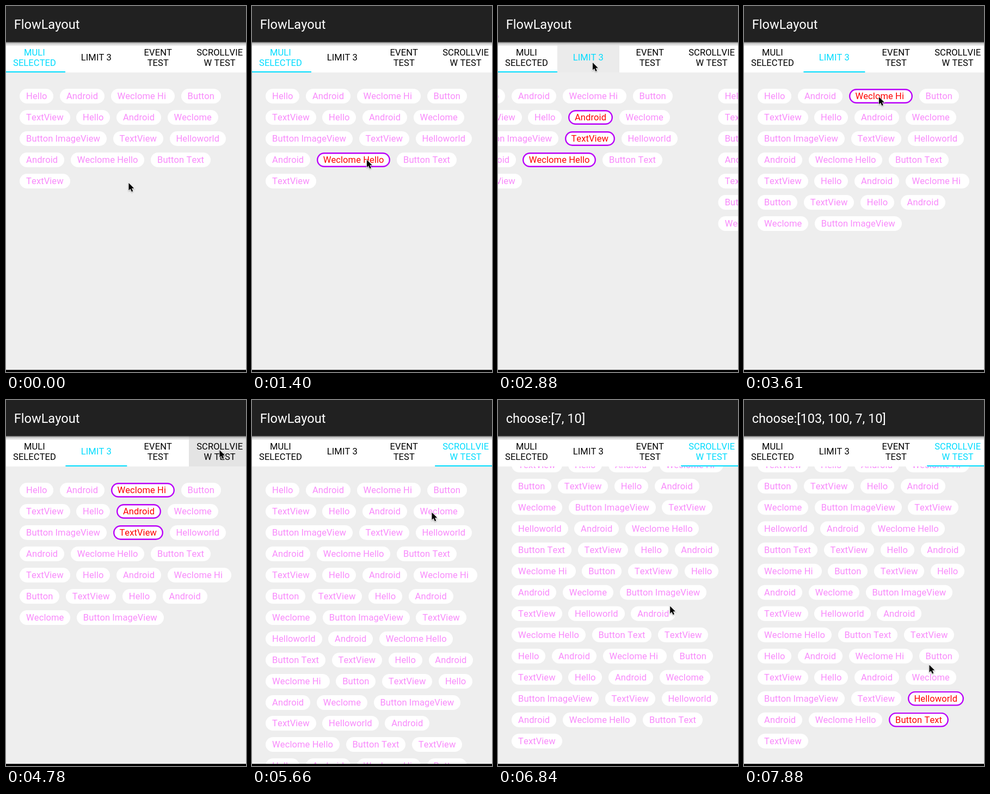
Write an HTML page that moves like this. It is 441 px wide and 672 px high and loops after 8 s.

```html
<!DOCTYPE html>
<html lang="en">
<head>
<meta charset="utf-8">
<title>FlowLayout</title>
<style>
  html, body { margin: 0; width: 100%; height: 100%; overflow: hidden; }
  #stage {
    position: relative; width: 441px; height: 672px; overflow: hidden; background: #eee;
    font: 16.54px/27px Roboto, sans-serif; font-kerning: none; letter-spacing: 0.08px; white-space: pre;
  }
  #bar, #shade, #tabs, #view, #foot, #cursor, #white, #line, .tab, .page { position: absolute; }
  #bar, #shade, #view, #foot { left: 0; width: 441px; }
  #bar {
    top: 0; height: 66px; background: #212121; color: #fff;
    font-size: 23.6px; line-height: 68px; text-indent: 14.7px; letter-spacing: 0;
  }
  #shade { top: 66px; height: 7px; background: linear-gradient(#0009, #0002 40%, #0000); }
  #tabs { left: -4.2px; top: 66px; width: 453.6px; height: 56px; }
  #white { left: 0; top: 6.5px; width: 100%; height: 49.5px; background: #fff; }
  .tab {
    top: 0; width: 25%; height: 56px; padding-top: 1px; box-sizing: border-box;
    display: flex; align-items: center; justify-content: center; text-align: center; line-height: 19px;
  }
  #line { top: 53.7px; left: 0; width: 25%; height: 2.3px; background: #00dcff; }
  #view { top: 122px; height: 546px; overflow: hidden; }
  .page {
    left: 25.3px; top: 30px; width: 400px;
    display: flex; flex-wrap: wrap; gap: 11.96px 11.8px;
  }
  .chip { height: 27px; padding: 0 11.8px; border-radius: 14px; background: #fff; color: #f88bfb; }
  .chip.on { color: #f00; box-shadow: inset 0 0 0 2.4px #b900f8; }
  #foot { top: 668px; height: 4px; background: #000; }
  #cursor { left: -2px; top: -2px; filter: drop-shadow(0 1px 1px #0005); }
</style>
</head>
<body>
<div id="stage"><div id="view"></div><div id="tabs"><div id="white"></div></div><div id="shade"></div>
<div id="bar"></div><div id="foot"></div>
<svg id="cursor" width="18" height="24" viewBox="-2 -2 18 24">
  <path transform="scale(.95)" d="M0 0V14.2L3.2 11.2L5.7 16.8L8.2 15.7L5.8 10.3H10.3Z" stroke="#fff" stroke-width="1.5" paint-order="stroke"/>
</svg></div>
<script>
const LOOP = 8000, PAGE = 453.6, TAB = PAGE / 4, EDGE = 4.2;
const FLING = { start: 32, steps: 3.455, distance: 708.3 };
const $ = id => document.getElementById(id);

const words = ['Hello', 'Android', 'Weclome Hi ', 'Button', 'TextView', 'Hello', 'Android', 'Weclome',
  'Button ImageView', 'TextView', 'Helloworld', 'Android', 'Weclome Hello', 'Button Text', 'TextView'];
const hashOrder = [103, 100, 7, 10];

// Pointer stops: [screen step, x, y]. From step 0 on, a stop taps whatever lies under it.
const stops = [
  [-14, 225.5, 325], [-9, 211, 282.5], [0, 211, 282.5], [4, 243, 243], [6, 243, 206], [10, 174, 104],
  [15, 248, 167], [18, 243, 206], [20, 243, 241], [24, 392.5, 92],
  [30, 330.5, 206.5], [32, 345, 243], [34, 310.5, 65.5], [40, 320, 587], [42, 345, 547], [44, 340.5, 486.5]
];

function add(parent, cls, text = '') {
  const el = document.createElement('div');
  el.className = cls;
  el.textContent = text;
  return parent.appendChild(el);
}

const pages = [15, 24, 15, 105].map(count => {
  const el = add($('view'), 'page');
  const chips = Array.from({ length: count }, (_, i) => add(el, 'chip', words[i % words.length]));
  return { el, chips };
});
const tabs = ['MULI\nSELECTED', 'LIMIT 3', 'EVENT\nTEST', 'SCROLLVIE\nW TEST'].map((label, i) => {
  const tab = add($('tabs'), 'tab', label);
  tab.style.left = i * TAB + 'px';
  return tab;
});
const line = add($('tabs'), '');
line.id = 'line';

const clamp = x => Math.min(1, Math.max(0, x));
const easeOut = (x, power) => 1 - (1 - clamp(x)) ** power;
const scrollAt = n => FLING.distance * easeOut((n - FLING.start) / FLING.steps, 2);

// Work out what each tap hits.
const picks = [], turns = [{ step: -99, tab: 0 }];
for (const [step, x, y] of stops) {
  if (step < 0 || y < 66) continue;
  const { tab } = turns[turns.length - 1];
  if (y < 122) {
    turns.push({ step, tab: Math.floor((x + EDGE) / TAB) });
    continue;
  }
  const { el, chips } = pages[tab];
  const px = x - el.offsetLeft, py = y - 122 - el.offsetTop + (tab === 3 ? scrollAt(step) : 0);
  const index = chips.findIndex(c => {
    const dx = px - c.offsetLeft + el.offsetLeft * (c.offsetParent !== el);
    const dy = py - c.offsetTop;
    return dx >= 0 && dx <= c.offsetWidth && dy >= 0 && dy <= c.offsetHeight;
  });
  if (index >= 0) picks.push({ step, tab, index });
}

// Page position, in pages, after every turn begun by step n.
function pageAt(n) {
  return turns.slice(1).reduce((p, { step, tab }) =>
    p + (tab - p) * easeOut((n - step + 0.119) / 3.4, 5), 0);
}

// The pointer rests for one step before each tap.
function pointerAt(n) {
  const i = stops.findIndex(s => s[0] >= n);
  if (i < 1) return stops[0].slice(1);
  const [n0, x0, y0] = stops[i - 1], [n1, x1, y1] = stops[i];
  const f = clamp((n - n0) / (n1 - 1 - n0));
  return [x0 + (x1 - x0) * f, y0 + (y1 - y0) * f];
}

const move = (el, x, y) => { el.style.transform = `translate(${x}px,${y}px)`; };
const stepAt = t => t < 1000 ? Math.floor((t + 10) / 150) - 14 : Math.floor((t - 1385) / 147.3);

function draw(n) {
  const page = pageAt(n);
  pages.forEach(({ el }, i) => move(el, (i - page) * PAGE, i === 3 ? -scrollAt(n) : 0));
  move(line, pageAt(n - 1) * TAB, 0);
  move($('cursor'), ...pointerAt(n));

  for (const { step, tab, index } of picks) pages[tab].chips[index].classList.toggle('on', n >= step);
  const chosen = hashOrder.filter(i => pages[3].chips[i].classList.contains('on'));
  $('bar').textContent = chosen.length ? `choose:[${chosen.join(', ')}]` : 'FlowLayout';

  const active = turns.filter(t => t.step <= n).pop().tab;
  tabs.forEach((tab, i) => {
    const touch = turns.find(t => t.tab === i && (n === t.step - 1 || n === t.step));
    tab.style.color = i === active ? '#00dcff' : '#000';
    tab.style.background = !touch ? 'none' : n < touch.step ? '#e4e4e4' : '#ebebeb';
  });
}

let last;
function frame() {
  const n = stepAt(performance.now() % LOOP);
  if (n !== last) draw(last = n);
  requestAnimationFrame(frame);
}
frame();
</script>
</body>
</html>
```
